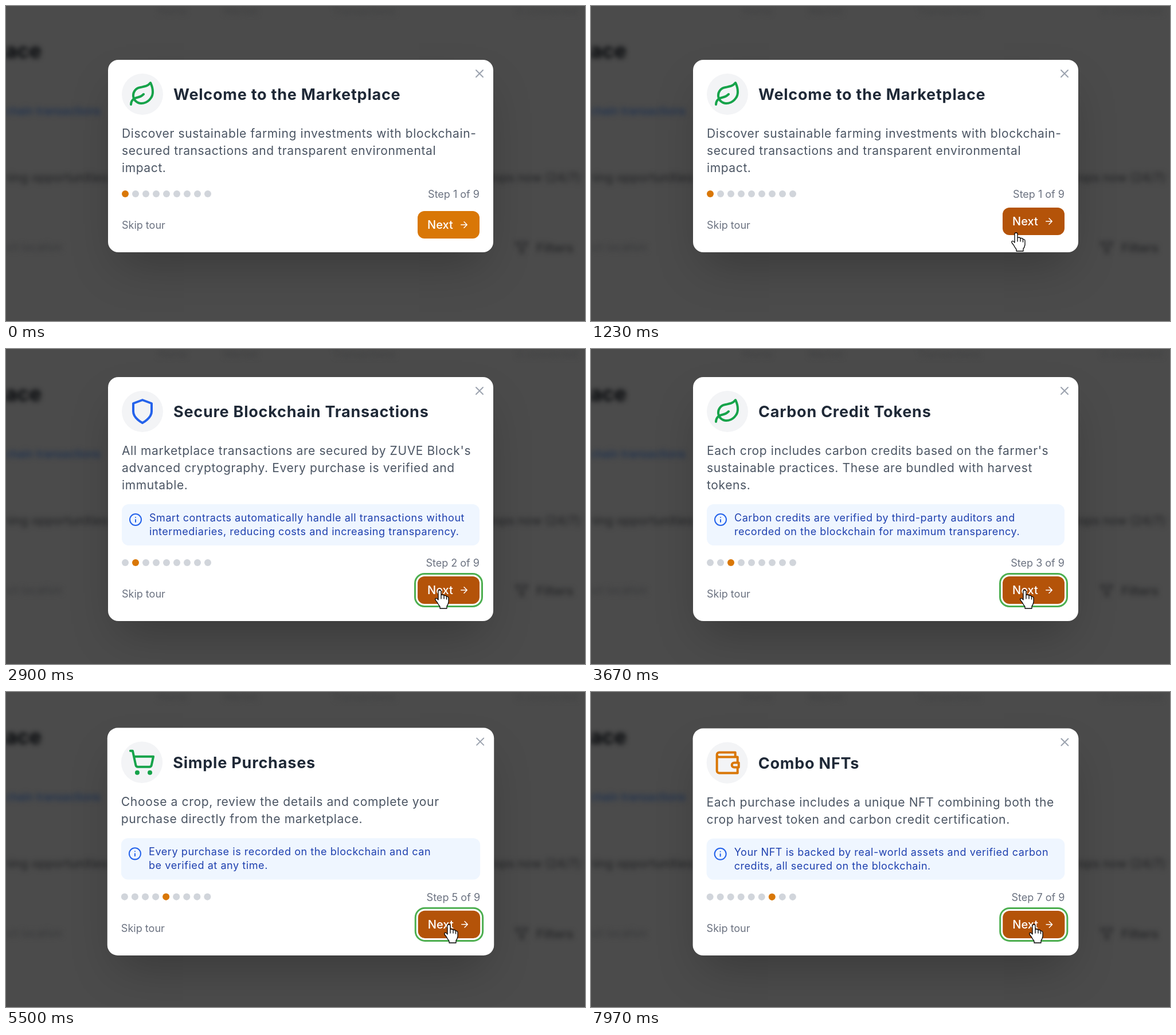
An HTML page for the animation above (8 s loop, 1010 px wide and 550 px high).

```html
<!DOCTYPE html>
<html lang="en">
<head>
<meta charset="utf-8">
<title>Marketplace tour</title>
<style>
html, body { margin: 0; width: 100%; height: 100%; overflow: hidden; }
body { position: relative; background: #4b4b4b; font-family: Inter, "Open Sans", sans-serif; }
svg { display: block; fill: none; stroke: currentColor; stroke-width: 2; stroke-linecap: round; stroke-linejoin: round; }
#page { position: absolute; inset: 0; overflow: hidden; filter: blur(4px); white-space: nowrap; }
#page > * { position: absolute; }
#stage { position: absolute; left: 178px; top: 0; width: 672px; height: 524px; display: flex; align-items: center; }
#card { position: relative; box-sizing: border-box; width: 672px; padding: 24px; border-radius: 18px;
  background: #fff; box-shadow: 0 37px 75px -18px rgba(0, 0, 0, .25); white-space: nowrap; }
#card > * { margin-bottom: 18px; }
.close { position: absolute; right: 12px; top: 12px; color: #9ca3af; }
.head { display: flex; align-items: center; gap: 18px; height: 72px; font: 700 27px Inter, sans-serif; letter-spacing: .028em; color: #1f2937; }
.badge { width: 72px; height: 72px; border-radius: 50%; background: #f3f4f6; display: grid; place-items: center; }
.body { font-size: 21px; line-height: 30px; letter-spacing: .029em; color: #4b5563; }
.info { display: flex; gap: 12px; padding: 12px; border-radius: 12px; background: #eff6ff;
  font-size: 18px; line-height: 24px; letter-spacing: .03em; color: #1e40af; }
.info svg { margin-top: 3px; color: #2563eb; }
.row { display: flex; align-items: center; justify-content: space-between; height: 24px; font-size: 18px; color: #6b7280; }
.dots { display: flex; gap: 6px; }
.dots i { width: 12px; height: 12px; border-radius: 50%; background: #d1d5db; }
.dots .on { background: #d97706; }
#card .foot { height: 48px; margin: 0; }
#next { position: relative; width: 108px; height: 48px; border-radius: 12px; color: #fff;
  font: 500 20px/48px Inter, sans-serif; text-indent: 17px; }
#next svg { position: absolute; left: 72px; top: 15px; }
.ring { box-shadow: 0 0 0 3px #fff, 0 0 0 6px #4caf50; }
#cursor { position: absolute; left: 0; top: 0; overflow: visible; fill: #fff; stroke: #000; stroke-width: 1.3; }
</style>
</head>
<body>
<div id="page"></div>
<div id="stage"><div id="card"></div></div>
<svg id="cursor" width="1" height="1"><path/></svg>
<script>
const LOOP = 8000;
const $ = id => document.getElementById(id);
const path = d => `<path d="${d}"/>`;
const svg = (shape, size) => `<svg width="${size}" height="${size}" viewBox="0 0 24 24">${shape}</svg>`;

const icons = {
  leaf: path('M11 20A7 7 0 0 1 9.8 6.1C15.5 5 17 4.48 19 2c1 2 2 4.18 2 8 0 5.5-4.78 10-10 10ZM2 21c0-3 1.85-5.36 5.08-6C9.5 14.52 12 13 13 12'),
  shield: path('M12 22s8-4 8-10V5l-8-3-8 3v7c0 6 8 10 8 10'),
  search: '<circle cx="11" cy="11" r="8"/>' + path('m21 21-4.3-4.3'),
  cart: '<circle cx="8" cy="21" r="1"/><circle cx="19" cy="21" r="1"/>' + path('M2 2h2l2.7 12.4a2 2 0 0 0 2 1.6h9.7a2 2 0 0 0 2-1.6L22 7H5.1'),
  bank: '<rect x="2" y="5" width="20" height="14" rx="2"/>' + path('M2 10h20'),
  wallet: path('M21 12V7H5a2 2 0 0 1 0-4h14v4M3 5v14a2 2 0 0 0 2 2h16v-5M18 12a2 2 0 0 0 0 4h4v-4Z'),
  info: '<circle cx="12" cy="12" r="10"/>' + path('M12 16v-4M12 8h.01'),
  arrow: path('M5 12h14M12 5l7 7-7 7'),
  close: path('M18 6 6 18M6 6l12 12'),
  funnel: path('M22 3H2l8 9.5V19l4 2v-8.5z')
};

// Each step: start time, icon, icon colour, title, body lines, note lines
const steps = [
  [0, 'leaf', '#16a34a', 'Welcome to the Marketplace',
    ['Discover sustainable farming investments with blockchain-', 'secured transactions and transparent environmental', 'impact.'], []],
  [1750, 'shield', '#2563eb', 'Secure Blockchain Transactions',
    ["All marketplace transactions are secured by ZUVE Block's", 'advanced cryptography. Every purchase is verified and', 'immutable.'],
    ['Smart contracts automatically handle all transactions without', 'intermediaries, reducing costs and increasing transparency.']],
  [3000, 'leaf', '#16a34a', 'Carbon Credit Tokens',
    ["Each crop includes carbon credits based on the farmer's", 'sustainable practices. These are bundled with harvest', 'tokens.'],
    ['Carbon credits are verified by third-party auditors and', 'recorded on the blockchain for maximum transparency.']],
  [4270, 'search', '#4b5563', 'Search and Filters',
    ['Easily find the perfect investment by searching for specific', 'crops, farmers, or locations.'],
    ['All search queries are processed securely without tracking.']],
  [5250, 'cart', '#16a34a', 'Simple Purchases',
    ['Choose a crop, review the details and complete your', 'purchase directly from the marketplace.'],
    ['Every purchase is recorded on the blockchain and can', 'be verified at any time.']],
  [6100, 'bank', '#9333ea', 'Gasless Transactions',
    ['Thanks to Account Abstraction and our CustomPaymaster,', 'you never pay blockchain gas fees.'],
    ['We cover all transaction fees, making the marketplace', 'accessible regardless of your crypto experience.']],
  [7600, 'wallet', '#d97706', 'Combo NFTs',
    ['Each purchase includes a unique NFT combining both the', 'crop harvest token and carbon credit certification.'],
    ['Your NFT is backed by real-world assets and verified carbon', 'credits, all secured on the blockchain.']]
];

// Time and hover amount of the button; halfway when its lower edge rests on the pointer
const hovers = [[0, 0], [650, 1], [1750, 0], [2340, 1], [4270, .5], [4800, 1]];
// Time and pointer position
const moves = [[100, 1030, 495], [750, 742, 397], [1800, 742, 397], [2130, 753, 387],
  [2420, 757, 422], [4650, 757, 422], [5000, 773, 407]];

const HAND = 'M-3 1Q-3-1-.5-1Q2-1 2 1V8Q2 7 4.5 7Q7 7 7 9Q7.5 8 9.5 8.5Q11.5 9 11.5 10.5Q12 10 13.5 10.5Q15 11 15 13V20Q14 25 12 27V31H0V28Q-3 24-5 20Q-9 16-8 14Q-6 12-3 16ZM-3 15V1M2 8V14M7 9V14M11.5 10.5V15';
const ARROW = 'M0 0V24L5.5 19L9.5 28L13.5 26L9.5 17.5H17Z';

// Blurred page behind: side the text hangs on, its distance, middle line, font, colour, text
$('page').innerHTML = [
  ['right', 948, 78, '700 36px', '#080a0d', 'Marketplace'],
  ['right', 845, 184, '500 19px', '#1c3050', 'Secure blockchain transactions'],
  ['right', 832, 300, '500 21px', '#262729', 'sustainable farming opportunities'],
  ['left', 830, 300, '500 21px', '#262729', 'crops now (24/7) with'],
  ['right', 912, 422, '400 19px', '#38393b', 'Select location'],
  ['left', 925, 422, '500 22px', '#232426', 'Filters'],
  ['left', 265, 9, '400 18px', '#404142', 'Home'],
  ['left', 380, 9, '400 18px', '#404142', 'Market'],
  ['left', 570, 9, '400 18px', '#404142', 'Transactions'],
  ['left', 890, 9, '400 18px', '#404142', '0 connected']
].map(([side, gap, y, font, color, text]) =>
  `<span style="${side}:${gap}px;top:${y - 20}px;font:${font}/40px Inter,sans-serif;color:${color}">${text}</span>`).join('') +
  `<div style="left:887px;top:410px;color:#232426">${svg(icons.funnel, 25)}</div>`;

function showStep(n) {
  const [, icon, color, title, body, note] = steps[n];
  const dots = Array.from({ length: 9 }, (_, i) => `<i class="${i === n ? 'on' : ''}"></i>`).join('');
  $('card').innerHTML = `
    <div class="close">${svg(icons.close, 24)}</div>
    <div class="head"><div class="badge" style="color:${color}">${svg(icons[icon], 48)}</div>${title}</div>
    <div class="body">${body.join('<br>')}</div>
    ${note.length ? `<div class="info">${svg(icons.info, 24)}<div>${note.join('<br>')}</div></div>` : ''}
    <div class="row"><div class="dots">${dots}</div><span>Step ${n + 1} of 9</span></div>
    <div class="row foot"><span>Skip tour</span><div id="next" class="${n ? 'ring' : ''}">Next${svg(icons.arrow, 18)}</div></div>`;
}

const clamp = v => Math.min(1, Math.max(0, v));
const ease = v => v * v * (3 - 2 * v);
const mix = (a, b, k) => a + (b - a) * k;
const lastAt = (list, t) => list.findLastIndex(item => item[0] <= t);

// Distance left of a slightly underdamped spring, s seconds after release
const spring = s => Math.exp(-12.5 * s) * (Math.cos(12 * s) + 12.5 / 12 * Math.sin(12 * s));

function pointer(t) {
  const i = Math.max(0, lastAt(moves, t)), a = moves[i], b = moves[i + 1] || a;
  const k = ease(clamp((t - a[0]) / (b[0] - a[0] || 1)));
  return [mix(a[1], b[1], k), mix(a[2], b[2], k)];
}

let shown = -1;
function draw(now) {
  const t = now % LOOP;
  const n = lastAt(steps, t);
  if (n !== shown) showStep(shown = n);

  const rest = n ? spring((t - steps[n][0]) / 1000) : 0;
  $('card').style.transform = Math.abs(rest) < .002 ? 'none' : `translateY(${20 * rest}px) scale(${1 - .1 * rest})`;
  $('card').style.opacity = clamp(1 - rest);

  const i = lastAt(hovers, t), [start, goal] = hovers[i];
  const lift = mix(i ? hovers[i - 1][1] : 0, goal, ease(clamp((t - start) / 150)));
  const rgb = [[217, 180], [119, 83], [6, 9]].map(([a, b]) => Math.round(mix(a, b, lift)));
  $('next').style.background = `rgb(${rgb})`;
  $('next').style.transform = `translateY(${-6 * lift}px)`;

  const [x, y] = pointer(t);
  $('cursor').style.transform = `translate(${x}px, ${y}px)`;
  $('cursor').firstChild.setAttribute('d', goal ? HAND : ARROW);
  requestAnimationFrame(draw);
}
requestAnimationFrame(draw);
</script>
</body>
</html>
```
